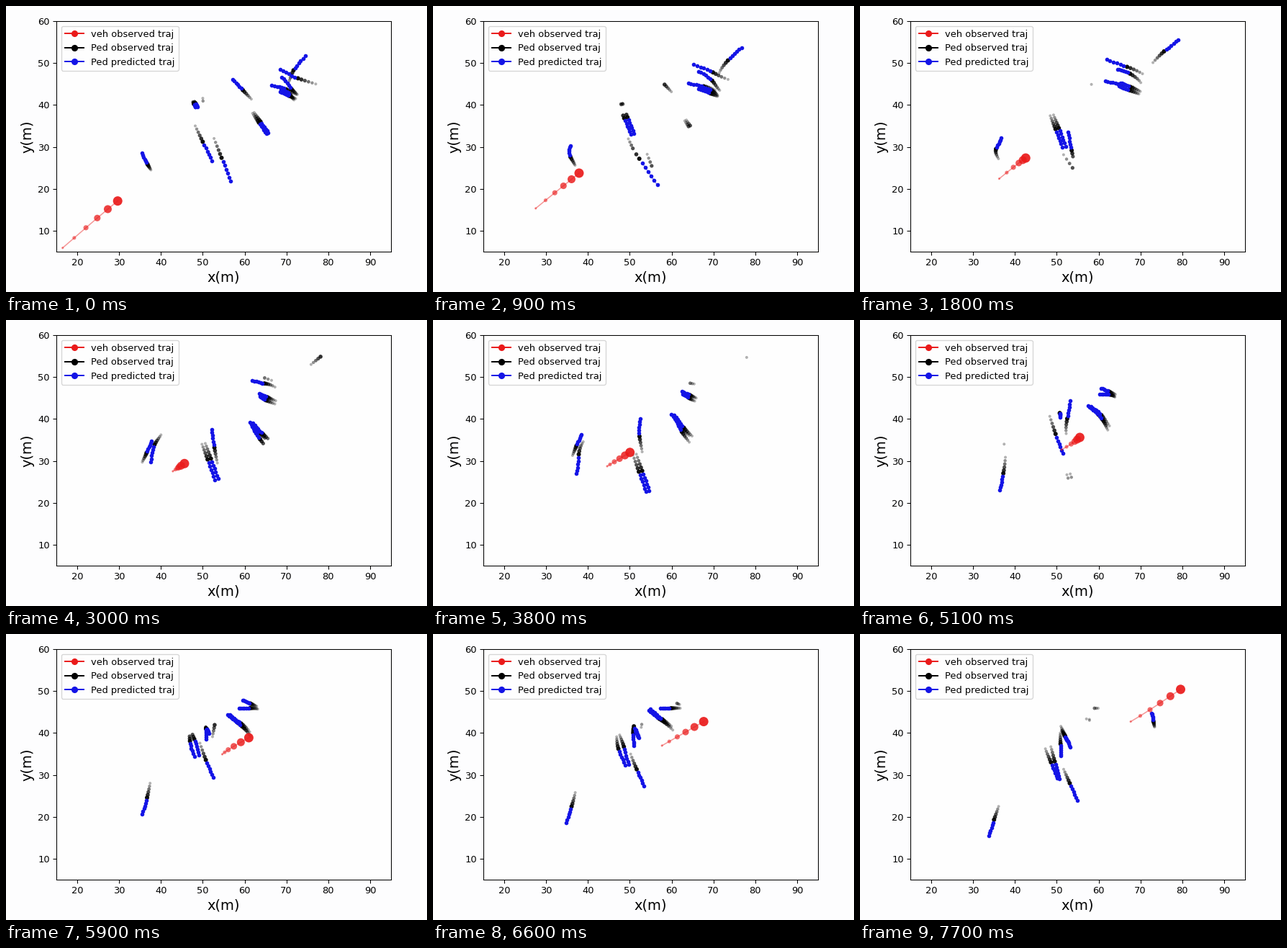
Write a matplotlib script that moves like this. It is 585 px wide and 397 px high and loops after 7800 ms.

```python
import numpy as np
import matplotlib.pyplot as plt
from matplotlib.animation import FuncAnimation
from matplotlib.collections import LineCollection

W, H, DPI = 585, 397, 100
FRAMES, INTERVAL = 78, 100
START, END = -11, 77          # earliest sample on show, last frame
STEP = 2.2                    # frames between two samples of a track
N_OBS, N_PRED = 6, 6
SCALE = 0.9375                # size of all line and text defaults
RED, BLUE = "#ea1a1a", "#1414e6"


class Walker:
    """Passes its points at an even beat from born to died, then goes straight on."""

    def __init__(self, born, died, *points, shift=(0, 0)):
        self.born, self.died = born, died
        self.p = np.array(points, float) + shift
        self.v = np.gradient(self.p, axis=0)
        self.legs = len(points) - 1

    def at(self, times):
        beat = (times - self.born) / (self.died - self.born) * self.legs
        inside = np.clip(beat, 0, self.legs)
        i = np.minimum(inside.astype(int), self.legs - 1)
        u = (inside - i)[:, None]
        ease = u * u * (3 - 2 * u)
        curve = (self.p[i] * (1 - ease) + self.p[i + 1] * ease
                 + u * (1 - u) * ((1 - u) * self.v[i] - u * self.v[i + 1]))
        return curve + (beat - inside)[:, None] * self.v[-1]

    def observed(self, now):
        times = now - STEP * np.arange(N_OBS - 1, -1, -1)
        seen = (times >= self.born) & (times <= self.died)
        return self.at(times)[seen], np.flatnonzero(seen)

    def predicted(self, now):
        return self.at(now + STEP * np.arange(1, N_PRED + 1))


def group(born, died, *points, shifts):
    """People walking together, each a little aside from the leader."""
    return [Walker(born, died, *points, shift=s) for s in shifts]


vehicle = Walker(START, END, (16.5, 5.9), (26.4, 14.4), (34.5, 21), (40.6, 25.9),
                 (43.4, 27.9), (45.2, 29.1), (49.5, 31.7), (53.7, 34.2),
                 (56.4, 36.2), (62.8, 39.9), (70.8, 44.6), (79.6, 50.4))

people = [
    # left side
    Walker(START, 41, (37.6, 24.5), (36.6, 26.2), (35.4, 28.9), (36.4, 31.5), (37.5, 34.2)),
    Walker(19, END, (40, 36.2), (38.1, 33), (37.4, 28), (36.4, 23.5), (35, 19.3)),
    # middle
    *group(START, 4, (47.6, 40.8), (48, 40), shifts=[(0, 0), (0.4, 0.1)]),
    *group(5, 43, (48.2, 38), (50.4, 32.4), (52.8, 25.6), shifts=[(0, 0), (0.8, 0.2)]),
    Walker(START, -7, (50, 41.6), (50.1, 40.4)),
    Walker(START, 5, (48.2, 35), (50.8, 29.5)),
    Walker(6, 14, (51.3, 28.6), (53.9, 24.8)),
    Walker(START, 5, (52.7, 32), (55.3, 25.3)),
    Walker(13, 58, (53.9, 27.5), (52.9, 32.5), (52.2, 37.5), (52.9, 42.3)),
    Walker(39, END, (48.2, 41), (50.6, 33.9), (53.1, 28)),
    Walker(53, END, (46.8, 39.6), (47.2, 36.5), (48.6, 33)),
    Walker(53, END, (47.4, 40), (48.5, 37), (49.5, 33.2)),
    Walker(48, END, (50.7, 41.5), (50.8, 40.6), (50.9, 37.4)),
    Walker(54, END, (50.9, 41), (51.1, 40.7), (51.9, 39.3)),
    Walker(64, END, (50.8, 42), (52, 39.3)),
    # right side
    Walker(START, 8, (61.6, 41.4), (58.1, 45.1)),
    *group(START, 5, (61.9, 38), (64.1, 34.8), shifts=[(0, 0), (0.4, 0.2)]),
    Walker(START, 25, (77, 45), (72.4, 46.5), (68.6, 48.4), (64.2, 50)),
    Walker(START, 28, (70.5, 45.3), (72, 48.8), (74.9, 52.1), (78.2, 54.9)),
    Walker(START, 19, (72.3, 42.5), (69, 44.1), (64.9, 45)),
    Walker(START, 33, (72.6, 42.5), (71.2, 43.8), (69.3, 46.2), (66.5, 48), (64.1, 48.6)),
    Walker(START, 60, (71.8, 41.2), (70, 43.2), (66.3, 44.8), (63.7, 46), (61.2, 47.1)),
    Walker(START, 71, (72.2, 41.5), (69.2, 42.8), (65, 44.5), (62.8, 45.8), (58.9, 45.9)),
    *group(22, 67, (65.1, 35.2), (62.4, 37.8), (59.8, 41.2), (56.9, 43.5),
           shifts=[(0, 0), (0.7, -0.1)]),
    Walker(24, 67, (64.7, 33.8), (62.4, 37), (60.7, 40.2), (57.6, 43.2)),
    Walker(67, END, (73.4, 41.3), (73.1, 42.8)),
]


def area(diameter):
    """Marker area in square points for a diameter in pixels."""
    return (np.asarray(diameter) * 72 / DPI) ** 2


plt.rcParams.update({
    "font.family": "DejaVu Sans",
    "font.size": 10 * SCALE,
    "axes.linewidth": 0.8 * SCALE,
    "axes.labelsize": 15 * SCALE,
    "axes.labelpad": 4 * SCALE,
    "lines.linewidth": 1.5 * SCALE,
    "lines.markersize": 6 * SCALE,
    "lines.markeredgewidth": SCALE,
    "patch.linewidth": SCALE,
})
for axis in ("xtick", "ytick"):
    plt.rcParams.update({f"{axis}.major.size": 3.5 * SCALE,
                         f"{axis}.major.pad": 3.5 * SCALE,
                         f"{axis}.major.width": 0.8 * SCALE})

fig = plt.figure(figsize=(W / DPI, H / DPI), dpi=DPI, facecolor="#fdfdfe")
ax = fig.add_axes([70 / W, 56 / H, 465 / W, 320 / H], facecolor="#fefefe")
ax.set(xlim=(15, 95), ylim=(5, 60), ylabel="y(m)",
       xticks=range(20, 100, 10), yticks=range(10, 70, 10))
ax.set_xlabel("x(m)", labelpad=3.2 * SCALE)

for color, label in ((RED, "veh observed traj"), ("black", "Ped observed traj"),
                     (BLUE, "Ped predicted traj")):
    ax.plot([], [], "o-", color=color, label=label)
ax.legend(loc="upper left")

past = ax.scatter([], [], linewidths=0, zorder=2.1)
links = LineCollection([], colors=BLUE, linewidths=0.8, alpha=0.6, zorder=2.2)
ax.add_collection(links, autolim=False)
ahead = ax.scatter([], [], s=area(5.6), color=BLUE, linewidths=0, zorder=2.3)
trail, = ax.plot([], [], color=RED, lw=1.1, alpha=0.45, zorder=2.4)
car = ax.scatter([], [], s=area(np.linspace(3.2, 13, N_OBS))[:0], zorder=2.5)
car.set(linewidths=0, sizes=area(np.linspace(3.2, 13, N_OBS)))
car.set_facecolors([(RED, a) for a in np.linspace(0.45, 0.92, N_OBS)])

# Samples grow and darken with recency
PED_SIZE = area(np.linspace(4, 6, N_OBS))
PED_COLOR = np.zeros((N_OBS, 4))
PED_COLOR[:, 3] = np.linspace(0.3, 0.95, N_OBS)


def update(frame):
    now = 10 if frame == 11 else frame    # the clock holds for one tick here
    spots, ranks = zip(*(p.observed(now) for p in people))
    ranks = np.concatenate(ranks)
    past.set_offsets(np.vstack(spots))
    past.set_sizes(PED_SIZE[ranks])
    past.set_facecolors(PED_COLOR[ranks])

    forecasts = [p.predicted(now) for p in people if p.born <= now <= p.died]
    links.set_segments(forecasts)
    ahead.set_offsets(np.vstack(forecasts))

    track, _ = vehicle.observed(now)
    trail.set_data(*track.T)
    car.set_offsets(track)
    return past, links, ahead, trail, car


anim = FuncAnimation(fig, update, frames=FRAMES, interval=INTERVAL,
                     repeat=True, repeat_delay=0, blit=False)
plt.show()
```
